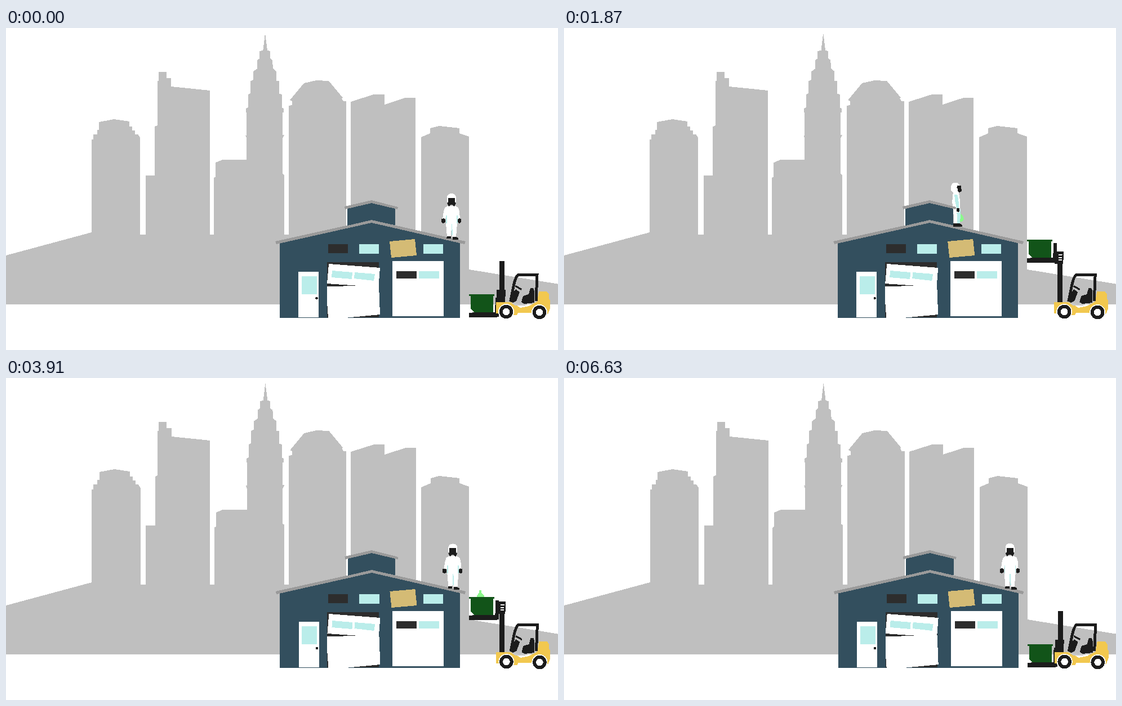
An HTML page for the animation above (6.8 s loop, 980 by 572 pixels).

```html
<!DOCTYPE html>
<html lang="en">
<head>
<meta charset="utf-8">
<title>Warehouse cleanup</title>
<style>
  html, body { margin: 0; width: 100%; height: 100%; overflow: hidden; background: #fff; }
  svg { display: block; width: 980px; height: 572px; shape-rendering: crispEdges; }
  .city { fill: #bfbfbf; }
  .wall { fill: #334f5e; }
  .roof { fill: #9a9a9a; }
  .white { fill: #fff; }
  .dark { fill: #2d2d2d; }
  .black { fill: #1c1c1c; }
  .glass { fill: #baedea; }
  .board { fill: #d4bb75; }
  .yellow { fill: #f2c84f; }
  .bin { fill: #125419; }
  .bag { fill: #8cf78c; }
  .frame { fill: none; stroke: #1c1c1c; stroke-width: 5; }
</style>
</head>
<body>
<svg viewBox="0 0 980 572">
  <g id="scene">
    <g class="city">
      <path d="M-2 404.5L152 363V366.5H822V429L982 455V491H-2z"/>
      <path d="M152 367V198h3v-9h7v-8h3.3v-14L192 162l27.3 4v9h5v7h5v7h5l4 6V367z"/>
      <path d="M248 367V262h16.3v-87l4.700-2V94h2V78h14v11h8.300v15L362 111V367z"/>
      <path d="M369.300 367V266l3-2V239l12-5H427.300V196l-2-5h2V150h-1V143l4-2V118l4-2V94l5-2V77l7-5V57l4-3V41l6-1L460 9L464 40l5 1V54l4 3l1 15l6 5V94h5v23l5 1v24l3 1v7h-2V190h3l-3 6V259l3 2V367z"/>
      <path d="M502 367V138l6-1V130l-4-2L529 98l22-5l22 1l25 30l-2 1l3 5h5V367z"/>
      <path d="M612 367V131l41-13h19v18L709 124h18.300V367z"/>
      <path d="M737 367V194l16.300-7v-9L769 174l36 4v9l17 6V367z"/>
    </g>

    <g id="building">
      <path class="wall" d="M486 515V382L649 344L806 382V515z"/>
      <path class="roof" d="M478 379L649 341L816 379L814 384L649 346L480 384z"/>
      <path class="dark" d="M572 384h35v16h-35zM570 416h92v98h-92z"/>
      <path class="glass" d="M627 384h35.300v16.500h-35.300zM741 384h35v16.500h-35z"/>
      <path class="board" d="M681 379L726 375L729 404L684 408z"/>
      <path class="white" d="M519.300 433h36v80.500h-36zM686 414h91v97.500h-91z"/>
      <path class="white" d="M573 419L664 426L661.500 458.500L627 458L570 454z"/>
      <path class="white" d="M570 459L627 458L662 457L664 509L602 515H572L570 487z"/>
      <path class="glass" d="M525 440.500h27v32.500h-27zM579 431L615 434L614 446L578 443zM619 434L655 437L653 449L618 445zM733 432h36v12.500h-36z"/>
      <path class="dark" d="M693 432h36v12.500h-36z"/>
      <circle class="black" cx="551.500" cy="480" r="2.200"/>
    </g>

    <path id="bag" class="bag" d="M-2 0h4l-1 4l5 5l2 7l-4 4h-8l-4-4l2-7l4-5z"/>

    <g id="worker">
      <g id="front">
        <path class="white" d="M-8-66V-75Q-7-81 0-81T8-75V-66z"/>
        <path class="white" d="M-7-59H7L12-56L14-49L15-36H11L9-42L10-28L8-4H1L0-25L-1-4H-8L-10-28L-9-42L-11-36H-16L-14-49L-12-56z"/>
        <path class="glass" d="M-10-42h1.500v14h-1.500zM9-42h1.500v14h-1.500zM-.500-27h1.500l1 20h-2z"/>
        <path class="black" d="M-6-73H6V-65L8-64L5-58L2-61H-2L-5-58L-8-64L-6-65z"/>
        <path class="black" d="M-18-36l5-1l2 2v5l-4 2l-3-2zM11-35l2-2l4 1v6l-3 2l-3-2zM-8-5h7v4h-8zM2-4h6l4 2v3h-10z"/>
      </g>
      <g id="side">
        <g id="rearLeg">
          <path class="white" d="M-7-31H4L2-5H-6z"/>
          <path class="black" d="M-7-6h8l2 3v3h-10z"/>
        </g>
        <g id="foreLeg">
          <path class="glass" d="M-3-31H4L3-6H-2z"/>
          <path class="black" d="M-3-6h6l4 3v3h-10z"/>
        </g>
        <path class="white" d="M-7-62L2-63L4-55L5-40L4-26L-7-25L-9-45L-8-57z"/>
        <path class="white" d="M-11-65V-72Q-10-79-3-79Q3-79 4-73L2-63L-7-61z"/>
        <path class="black" d="M0-73h7v4l1 5l-4 3l-3-3v-3l-2-3z"/>
        <path class="glass" d="M-5-57L0-58L2-50L3-34L-1-33L-4-46z"/>
        <path class="black" d="M-1-33h5v4l-2 3l-3-2z"/>
      </g>
    </g>

    <g id="cupola">
      <path class="wall" d="M606.300 351V320L649 310L691 320V350.500L649 341z"/>
      <path class="roof" d="M601 317L649 306L696 318L695 322L649 311L602 322z"/>
    </g>

    <g id="truck">
      <path class="black" d="M876 414h9v73h-9z"/>
      <g id="rungs">
        <path class="black" fill-rule="evenodd" d="M871 0H887V4L886 20V22H871zM878 5h7l-1 2h-6zM878 10h6v1.500h-6zM878 14h6v1.500h-6z"/>
      </g>
      <g id="lift">
        <path class="bin" d="M822 473h45v3h-2V505h-34l-6-6V476h-3z"/>
        <path class="black" d="M822 506l12-1h34l1-26h6v34l-6 1h-47z"/>
      </g>
      <path class="yellow" d="M870 487H898L913 497L928 494L943 486L946 468H960L964 473V482L966 484V498L962 508H934V506H909L907 510H901L896 498H880L876 507H870z"/>
      <path fill="#c9c9c9" d="M895 487L912 491L941 481V487L920 493H904z"/>
      <path class="frame" d="M896 484L901 459Q905 440 910 438H943L941 485"/>
      <path class="black" d="M893 485L902 468L905 464L912 469L906 485L900 488zM905 457l11 6l-1 3l-11-6zM915 487L918 476L928 473L931 462H936L938 467V488L920 490z"/>
      <g id="wheels"></g>
    </g>
  </g>
</svg>
<script>
  const LOOP = 6800, STEP = 170, MAX_RISE = 97;
  const $ = id => document.getElementById(id);
  const clamp = (v, lo, hi) => Math.min(hi, Math.max(lo, v));
  const mix = (a, b, k) => a + (b - a) * k;
  const move = (id, x, y, extra = '') => $(id).setAttribute('transform', `translate(${x} ${y}) ${extra}`);
  const show = (id, on) => $(id).setAttribute('display', on ? 'inline' : 'none');

  // Linear interpolation through [time, value] pairs.
  function track(keys, t) {
    const i = keys.findIndex(key => key[0] > t);
    if (i < 0) return keys[keys.length - 1][1];
    if (i === 0) return keys[0][1];
    const [t0, a] = keys[i - 1], [t1, b] = keys[i];
    return mix(a, b, (t - t0) / (t1 - t0));
  }

  const LIFT = [[510, 0], [1480, MAX_RISE], [3780, MAX_RISE], [4750, 0]];
  const WALK = [[590, 791], [1635, 697], [1945, 697], [3010, 793], [5000, 793], [5200, 791]];
  const THROW = { start: 3060, end: 3400 };
  const roofY = x => 342.500 + Math.abs(x - 649) * 0.229;

  for (const [x, y] of [[888, 504], [947, 505]]) {
    [['white', 14], ['black', 12.300], ['white', 6.300]].forEach(([name, r]) =>
      $('wheels').insertAdjacentHTML('beforeend', `<circle class="${name}" cx="${x}" cy="${y}" r="${r}"/>`));
  }

  function drawWorker(t, x, y) {
    const walking = t > 590 && t < 3010;
    const goingLeft = t < 1800;
    const paused = t > 1635 && t < 1945;
    const swing = paused ? 0 : Math.cos(t / STEP * Math.PI / 2 + 1.200);
    move('worker', x, y);
    show('front', !walking);
    show('side', walking);
    $('side').setAttribute('transform', goingLeft ? 'scale(-1 1)' : 'translate(1 0)');
    $('foreLeg').setAttribute('transform', `translate(2 0) rotate(${-14 * swing} 0 -31)`);
    $('rearLeg').setAttribute('transform', `rotate(${3 * swing} 0 -31)`);
  }

  function drawBag(t, x, y, rise) {
    show('bag', t >= 1800 && t < 5270);
    if (t < THROW.start) {
      move('bag', x + 5, y - 29);
    } else if (t < THROW.end) {
      const k = (t - THROW.start) / (THROW.end - THROW.start);
      move('bag', mix(799, 842, k), mix(y - 32, 364, k) - 56 * k * (1 - k));
    } else {
      const above = clamp(12 - (t - 3910) * 6 / 680, 0, 12);
      move('bag', 842, 473 - rise - above);
    }
  }

  function draw(t) {
    const rise = track(LIFT, t);
    const x = track(WALK, t), y = roofY(x);
    move('scene', 0.700 * t / LOOP, 0);
    move('lift', 0, -rise);
    move('rungs', 0, clamp(479 - rise, 397, 465));
    drawWorker(t, x, y);
    drawBag(t, x, y, rise);
  }

  const start = performance.now();
  function tick() {
    const t = (performance.now() - start) % LOOP;
    draw(Math.floor(t / STEP) * STEP);
    requestAnimationFrame(tick);
  }
  tick();
</script>
</body>
</html>
```
